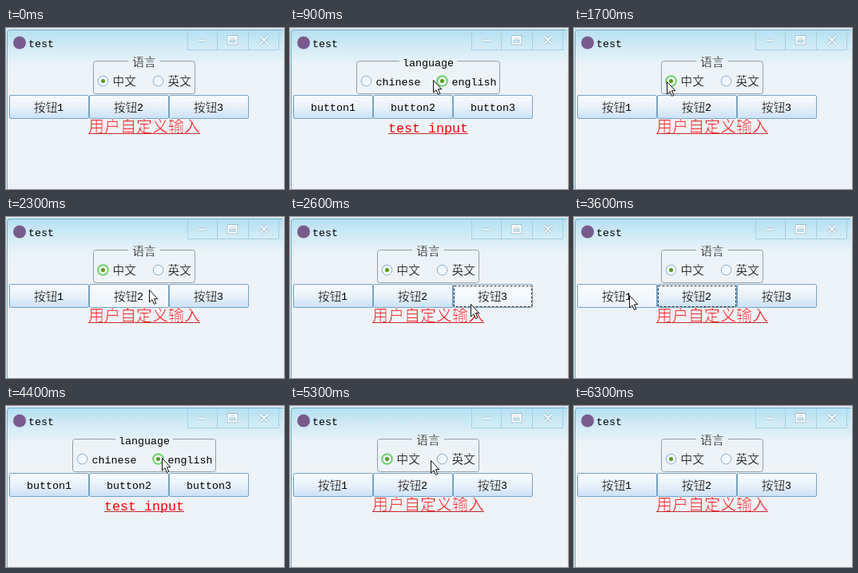
Recreate the animation shown at these times as an HTML page. Size 348 by 202 pixels, loop 6.4 s.

```html
<!DOCTYPE html>
<html lang="zh">
<head>
<meta charset="utf-8">
<title>test</title>
<style>
html, body { margin: 0; width: 100%; height: 100%; overflow: hidden; background: #eef3f7; }
svg { display: block; width: 348px; height: 202px; }
text { font-family: "Noto Sans CJK SC", "Noto Sans CJK", sans-serif; font-size: 14.667px; font-weight: 300;
  fill: #000; stroke: #eef3f7; stroke-width: .3px; }
.mono { font-family: "Liberation Mono", monospace; font-size: 13.333px; font-weight: 400; stroke: none; }
.red { font-size: 20px; fill: #f00; stroke-width: .6px; }
.red.mono { font-size: 16.667px; }
</style>
</head>
<body>
<svg viewBox="0 0 348 202" xmlns="http://www.w3.org/2000/svg">
  <defs>
    <linearGradient id="win" x1="0" y1="0" x2="0" y2="1">
      <stop offset="0" stop-color="#b3def2"/>
      <stop offset=".1" stop-color="#cce9f6"/>
      <stop offset=".22" stop-color="#e9f3f8"/>
      <stop offset=".3" stop-color="#eef3f7"/>
    </linearGradient>
    <linearGradient id="btn" x1="0" y1="0" x2="0" y2="1">
      <stop offset="0" stop-color="#f8fbfe"/>
      <stop offset=".5" stop-color="#e9f2fa"/>
      <stop offset="1" stop-color="#c9e2f8"/>
    </linearGradient>
    <linearGradient id="hot" x1="0" y1="0" x2="0" y2="1">
      <stop offset="0" stop-color="#f8fbfe"/>
      <stop offset="1" stop-color="#edf4fa"/>
    </linearGradient>
    <linearGradient id="disc" x1="0" y1="0" x2="1" y2="1">
      <stop offset="0" stop-color="#e6eff7"/>
      <stop offset="1" stop-color="#fff"/>
    </linearGradient>
    <path id="tools" d="M241 15.5H250M278.5 11H288.5V19.5H278.5ZM279 13.5H288M318.5 10.5L327.5 19.5M327.5 10.5L318.5 19.5"/>
  </defs>
  <rect width="348" height="202" fill="url(#win)"/>
  <rect width="348" height="2" fill="#dde9f0"/>
  <g fill="none">
    <path d="M1.5 202V6Q1.5 2.5 5 2.5H346" stroke="#69adcb"/>
    <path d="M.5 2V202M347.5 4V202" stroke="#e6eff4"/>
    <path d="M227.5 3V27.5H341.5V3M264.5 3V27M303.5 3V27" stroke="#a5cfe2"/>
    <use href="#tools" stroke="#8fb4c6" stroke-width="3.4"/>
    <use href="#tools" stroke="#fff" stroke-width="2"/>
  </g>
  <circle cx="17" cy="18.5" r="8" fill="#7a5a8c"/>
  <text class="mono" x="28" y="24">test</text>
  <g id="ui"></g>
  <path id="cursor" d="M.5 .5V16L4 12.7L6.4 18.4L8.8 17.4L6.4 11.7H10.8Z" fill="#fff" stroke="#111" stroke-linejoin="round"/>
</svg>
<script>
const LOOP = 6400, STEP = 100, CENTER = 173, RADIO_Y = 66.5;
const ui = document.getElementById("ui");
const cursor = document.getElementById("cursor");

const chinese = { title: "语言", radios: ["中文", "英文"], button: "按钮", input: "用户自定义输入",
                  css: "", em: 16, half: 64, inputHalf: 70, lag: 100 };
const english = { title: "language", radios: ["chinese", "english"], button: "button", input: "test input",
                  css: "mono", em: 8, half: 90, inputHalf: 50, lag: 200 };
const languages = [chinese, english];

const spots = {
  entry: [335, 38], radio0: [116, 67], radio1: [195, 65],
  button1: [69, 98], button2: [148, 102], button3: [226, 109],
  below: [192, 124], aside: [236, 69], exit: [348, 48]
};

// The pointer travels from start to end, then presses at click
const trips = [
  { start: 100, end: 400, to: "radio1", click: 600 },
  { start: 800, end: 1300, to: "radio0", click: 1600 },
  { start: 1900, end: 2600, to: "button3", click: 2600 },
  { start: 2600, end: 2800, to: "below" },
  { start: 3000, end: 3300, to: "button2", click: 3300 },
  { start: 3300, end: 3600, to: "button1", click: 3700 },
  { start: 3700, end: 4200, to: "radio1", click: 4200 },
  { start: 4400, end: 4800, to: "radio0", click: 5000 },
  { start: 5000, end: 5600, to: "aside" },
  { start: 5600, end: 6000, to: "exit" }
];
const BLUR = 6300;

function pointer(t) {
  if (t < trips[0].start || t >= trips.at(-1).end) return null;
  const i = trips.findLastIndex(trip => trip.start <= t);
  const { start, end, to } = trips[i];
  const a = spots[i ? trips[i - 1].to : "entry"], b = spots[to];
  const p = Math.min(1, (t - start) / (end - start));
  return a.map((v, k) => Math.round(v + (b[k] - v) * p));
}

// Everything on screen follows from the presses so far
function stateAt(t) {
  const state = { lang: 0, checked: 0, focus: "" };
  for (const { to, click } of trips) {
    if (!(click <= t)) continue;
    state.focus = to;
    if (to.startsWith("radio")) {
      state.checked = +to.slice(-1);
      if (t >= click + languages[state.checked].lag) state.lang = state.checked;
    }
  }
  if (t >= BLUR) state.focus = "";
  return state;
}

const inside = (tip, x, y, w, h) =>
  tip && tip[0] >= x && tip[0] < x + w && tip[1] >= y && tip[1] < y + h;

const label = (x, y, s, css, anchor = "start") =>
  `<text x="${x}" y="${y}" class="${css}" text-anchor="${anchor}">${s}</text>`;

function groupBox({ title, css, em, half }) {
  const l = CENTER - half + .5, r = CENTER + half - .5, gap = title.length * em / 2 + 4;
  return `<path d="M${CENTER - gap} 41.5H${l + 3}q-3 0 -3 3V79.5q0 3 3 3H${r - 3}q3 0 3 -3V44.5q0 -3 -3 -3H${CENTER + gap}"
    fill="none" stroke="#939da4"/>` + label(CENTER, 48, title, css, "middle");
}

function radio(i, L, state, tip) {
  const x = i ? 190.5 : CENTER - L.half + 12.5, text = L.radios[i];
  const hot = state.focus === "radio" + i || inside(tip, x - 7, 59, text.length * L.em + 20, 16);
  return `<circle cx="${x}" cy="${RADIO_Y}" r="6.3" fill="url(#disc)" stroke="${hot ? "#6ad468" : "#86afd2"}" stroke-width="${hot ? 2 : 1}"/>`
    + (state.checked === i ? `<circle cx="${x}" cy="${RADIO_Y}" r="2.5" fill="#569c12"/>` : "")
    + label(x + 12, L.css ? 71.5 : 72, text, L.css);
}

function button(n, L, state, tip) {
  const x = 100 * n - 96, mid = x + 50;
  const fill = inside(tip, x, 84, 100, 30) ? "hot" : "btn";
  return `<rect x="${x + .5}" y="84.5" width="99" height="29" rx="1.5" fill="url(#${fill})" stroke="#76a3c6"/>`
    + (state.focus === "button" + n
      ? `<rect x="${x + 1.5}" y="86.5" width="97" height="26" fill="none" stroke="#333" stroke-dasharray="3 2"/>` : "")
    + (L.css ? label(mid, 104, L.button + n, L.css, "middle")
      : label(x + 31, 104.5, L.button, "") + label(x + 60, 104, n, "mono"));
}

function render(t) {
  const state = stateAt(t), L = languages[state.lang], tip = pointer(t);
  ui.innerHTML = groupBox(L)
    + [0, 1].map(i => radio(i, L, state, tip)).join("")
    + [1, 2, 3].map(n => button(n, L, state, tip)).join("")
    + label(CENTER, L.css ? 130.5 : 131, L.input, "red " + L.css, "middle")
    + `<path d="M${CENTER - L.inputHalf} 132.5h${2 * L.inputHalf}" stroke="#c42832"/>`;
  cursor.style.display = tip ? "" : "none";
  if (tip) cursor.setAttribute("transform", `translate(${tip})`);
}

const origin = performance.now();
let shown = -1;
function tick() {
  const t = Math.floor((performance.now() - origin) % LOOP / STEP) * STEP;
  if (t !== shown) render(shown = t);
  requestAnimationFrame(tick);
}
tick();
</script>
</body>
</html>
```
